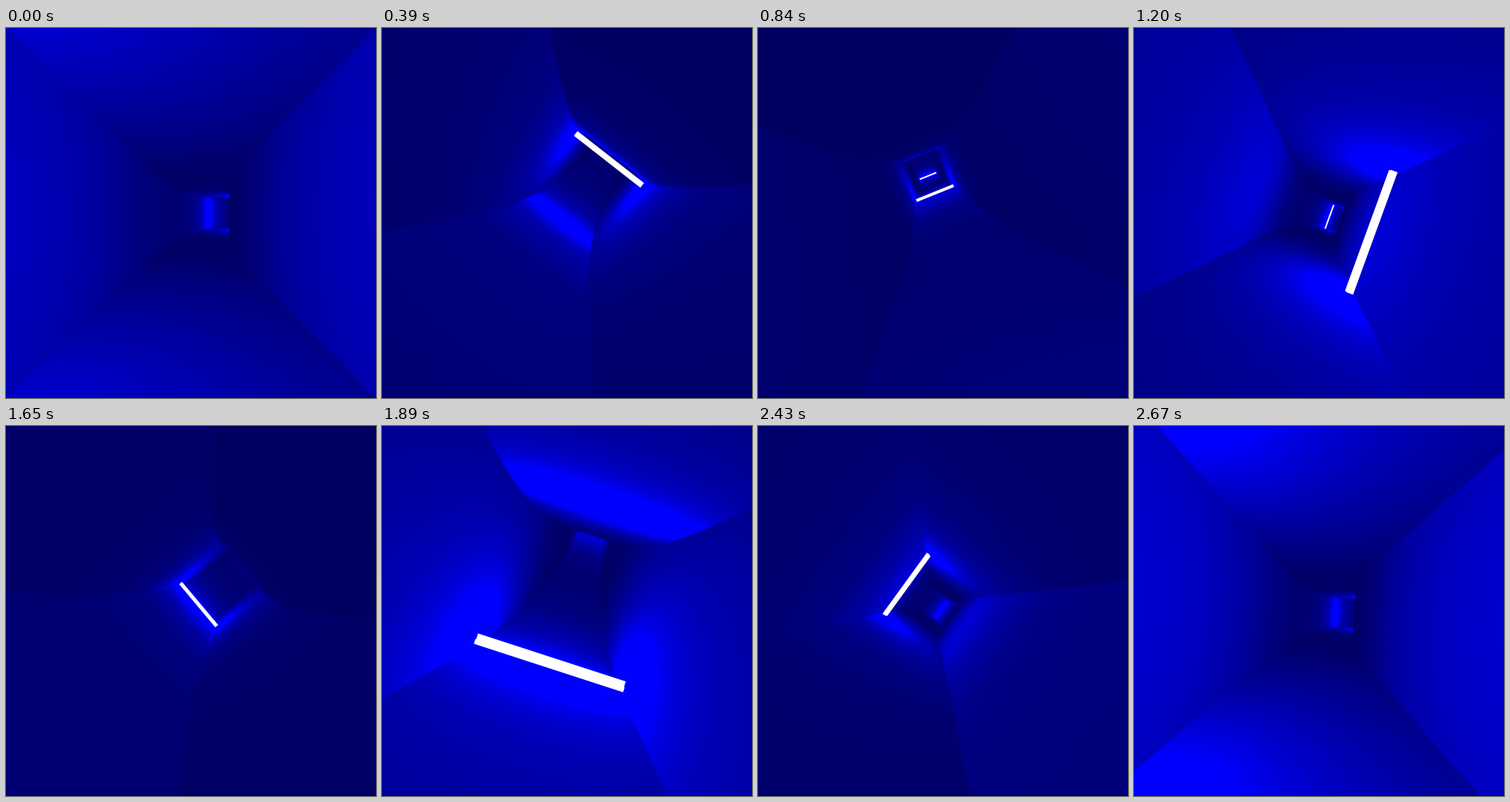
An HTML page with a canvas that plays this animation: 500x500 px, repeating every 2700 ms.

```html
<!DOCTYPE html>
<html lang="en">
<head>
<meta charset="utf-8">
<title>Blue tunnel</title>
<style>
  html, body { margin: 0; width: 100%; height: 100%; overflow: hidden; background: #00005a; }
  canvas { display: block; width: 500px; height: 500px; }
</style>
</head>
<body>
<canvas id="stage" width="500" height="500"></canvas>
<script>
const STEP = 30, STEPS = 90;
const SPEED = 0.487, LOOP = STEPS * SPEED, GAP = LOOP / 4;
const FOCAL = 255, SWAY = 4, FREQ = 2 * Math.PI / LOOP;
const TUBE = { offset: 0.88, half: 0.97, r: 0.065 };
const AMBIENT = 56, POWER = 262, WRAP = 0.43;
const NZ = 1800, NU = 64;
const SIZE = 710, HALF = SIZE / 2;

// The tunnel has a square section (half width 1) across a snaking path.
const path = z => -SWAY * Math.sin(z * FREQ);
const slope = z => -SWAY * FREQ * Math.cos(z * FREQ);
const stretch = z => Math.hypot(1, slope(z));
const across = (x, z) => (x - path(z)) / stretch(z);

// Tubes stand upright, alternating between the left and right wall.
function tubeAt(k) {
  const z = k * GAP, d = (k % 2 ? TUBE.offset : -TUBE.offset) / stretch(z);
  return { x: path(z) + d, z: z - d * slope(z) };
}

const lamps = [];
for (let k = -3; k <= 7; k++) lamps.push(tubeAt(k));

function light(x, y, z, nx, ny, nz) {
  let sum = 0;
  for (const lamp of lamps) {
    const dz = lamp.z - z;
    if (Math.abs(dz) > 2.2 * GAP) continue;
    const dx = lamp.x - x;
    for (let s = -2; s <= 2; s++) {
      const dy = s * TUBE.half * 0.45 - y;
      const d = Math.max(0.12, Math.sqrt(dx * dx + dy * dy + dz * dz));
      const cos = Math.max(0, (dx * nx + dy * ny + dz * nz) / d);
      sum += (cos + WRAP) / (1 + WRAP) / d / 5;
    }
  }
  const blue = Math.min(255, Math.round(AMBIENT + POWER * sum));
  return (0xff000000 | blue << 16) >>> 0;
}

// Light maps of the right wall and the ceiling; the others follow by symmetry.
const side = new Uint32Array(NZ * NU), ceiling = new Uint32Array(NZ * NU);
for (let i = 0; i < NZ; i++) {
  const z = (i + 0.5) / NZ * LOOP, c = path(z), m = slope(z), n = stretch(z);
  for (let j = 0; j < NU; j++) {
    const u = (j + 0.5) / NU;
    side[i * NU + j] = light(c + n, u, z, -1 / n, 0, m / n);
    ceiling[i * NU + j] = light(c + (2 * u - 1) * n, -1, z, 0, 1, 0);
  }
}

const rowOf = z => Math.floor(z / LOOP * NZ + 4 * NZ) % NZ * NU;
const cell = u => Math.max(0, Math.min(NU - 1, Math.floor(u * NU)));

const buffer = document.createElement('canvas');
buffer.width = buffer.height = SIZE;
const bufferCtx = buffer.getContext('2d');
const image = bufferCtx.createImageData(SIZE, SIZE);
const pixels = new Uint32Array(image.data.buffer);
const ctx = document.getElementById('stage').getContext('2d');

// Depth at which a column's ray leaves the tunnel sideways.
function wallDepth(x0, z0, dx, dz) {
  const out = t => Math.abs(across(x0 + dx * t, z0 + dz * t)) > 1;
  let far = 0.2;
  while (far < 60 && !out(far)) far += 0.2;
  let near = far - 0.2;
  for (let i = 0; i < 10; i++) {
    const mid = (near + far) / 2;
    if (out(mid)) far = mid; else near = mid;
  }
  return far;
}

// Depth of the first tube on the ray, or 0.
function tubeDepth(x0, z0, dx, dz, limit) {
  const len = Math.hypot(dx, dz), first = Math.floor(z0 / GAP);
  for (let k = first; k < first + 5; k++) {
    const lamp = tubeAt(k), x = lamp.x - x0, z = lamp.z - z0;
    const t = (x * dx + z * dz) / (len * len);
    if (t > 0.1 && t < limit && Math.abs(x * dz - z * dx) / len < TUBE.r) return t;
  }
  return 0;
}

function render(step) {
  const z0 = step * SPEED, x0 = path(z0);
  const yaw = Math.atan(slope(z0)), cos = Math.cos(yaw), sin = Math.sin(yaw);
  for (let i = 0; i < SIZE; i++) {
    const xs = (i + 0.5 - HALF) / FOCAL;
    const dx = sin + xs * cos, dz = cos - xs * sin;
    const wall = wallDepth(x0, z0, dx, dz);
    const tube = tubeDepth(x0, z0, dx, dz, wall);
    const wz = z0 + dz * wall;
    const isRight = x0 + dx * wall > path(wz);
    const row = rowOf(isRight ? wz : wz + LOOP / 2);
    for (let j = 0; j < HALF; j++) {
      const ys = (j + 0.5) / FOCAL;
      let color;
      if (tube && ys * tube < TUBE.half) {
        color = 0xffffffff;
      } else if (ys * wall < 1) {
        color = side[row + cell(ys * wall)];
      } else {
        const t = 1 / ys, z = z0 + dz * t;
        color = ceiling[rowOf(z) + cell((across(x0 + dx * t, z) + 1) / 2)];
      }
      pixels[(HALF + j) * SIZE + i] = color;
      pixels[(HALF - 1 - j) * SIZE + i] = color;
    }
  }
  bufferCtx.putImageData(image, 0, 0);
  ctx.setTransform(1, 0, 0, 1, 250, 250);
  ctx.rotate(-step / STEPS * 2 * Math.PI);
  ctx.drawImage(buffer, -HALF, -HALF);
}

let shown = -1;
function tick() {
  const step = Math.floor(performance.now() / STEP) % STEPS;
  if (step !== shown) render(shown = step);
  requestAnimationFrame(tick);
}
tick();
</script>
</body>
</html>
```
